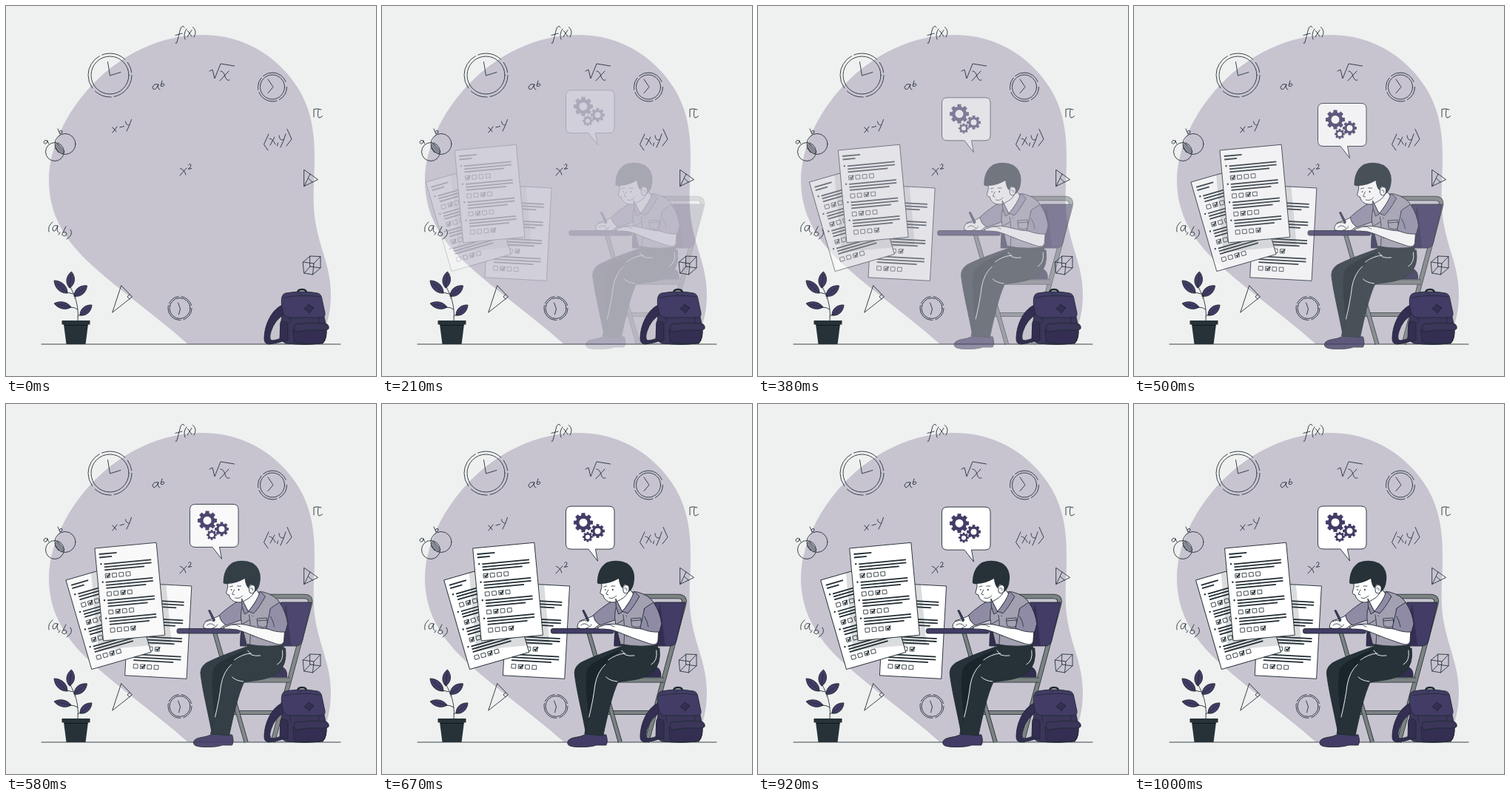
Animation of 500 by 500 pixels, one loop 1.04 s. Source, as an HTML page:

```html
<!DOCTYPE html>
<html lang="en">
<head>
<meta charset="utf-8">
<title>Student at work</title>
<style>
html, body { margin: 0; width: 100%; height: 100%; overflow: hidden; background: #eff1f0; }
svg { display: block; width: 100vw; height: 100vh; }
.ln { fill: none; stroke: #263238; stroke-width: .9; stroke-linecap: round; stroke-linejoin: round; }
.ol { stroke: #1f2b31; stroke-width: .9; stroke-linejoin: round; }
.white { fill: #fff; }
.dark { fill: #263238; }
.shadow { fill: #1a252b; }
.purple { fill: #423c66; }
.mid { fill: #3b365a; }
.deep { fill: #332e52; }
.shirt { fill: #a3a0b1; }
.sleeve { fill: #8f8ba5; }
.thin { fill: none; stroke: #1f2b31; stroke-width: .8; stroke-linecap: round; }
.crease { fill: none; stroke: #fff; stroke-width: .9; stroke-linecap: round; }
.tube { fill: none; stroke-linejoin: round; }
</style>
</head>
<body>
<svg viewBox="0 0 500 500">
  <rect width="500" height="500" fill="#eff1f0"/>
  <path fill="#c7c4d0" d="M246 457C203 419 152 383 117 351C80 318 58 282 58 236C58 150 148 39 266 39C325 39 370 72 394 110C412 138 417 170 417 203C417 235 414 258 417 284C422 325 439 350 439 390C439 420 431 440 420 457Z"/>
  <path class="ln" d="M48 457H452"/>

  <g id="papers"></g>

  <g id="bubble">
    <path class="white ol" d="M256 138H307Q314 138 314 145V189Q314 196 307 196H288.500L291.500 212L279 196H256Q248.500 196 248.500 189V145Q248.500 138 256 138Z"/>
    <path id="gears" class="purple" fill-rule="evenodd"/>
  </g>

  <g id="student">
    <g id="chair"></g>
    <path class="purple ol" d="M369 268H410L398 320Q396 327 389 327H371Z"/>
    <path class="deep" d="M376 270L383 327H373L369 295Z"/>
    <path class="deep ol" d="M292 357L370 355Q378 358 377 369H287Z"/>
    <path class="deep ol" d="M316 300L323 327H314Q314 312 316 300Z"/>

    <!-- legs and shoe -->
    <path class="purple ol" d="M277 446Q268 450 259 451Q250 453 251 459Q252 463 264 463.500Q282 464 290 461H303Q306 456 303 447Z"/>
    <path class="dark ol" d="M323 328C306 334 283 342 268 350Q258 357 261 369C264 391 270 414 276 446H290L308 370L340 340Z"/>
    <path class="shadow" d="M324 331C303 340 284 348 278 358C274 372 277 398 279 420L300 372Z"/>
    <path class="dark ol" d="M326 327L375 330Q378 352 365 363C351 374 332 373 319 376C311 393 305 420 299 448L274 446C279 422 284 405 286 388C287 372 293 361 302 352C309 344 319 338 326 327Z"/>
    <path class="crease" d="M302 352Q291 362 288 380Q286 398 280 423M306 346Q316 338 329 337M303 369Q308 374 318 375M324 333L329 339Q335 341 341 340M371 333Q373 347 364 352"/>

    <!-- far arm -->
    <path class="sleeve ol" d="M320 262Q302 270 285 286Q288 295 295 299L320 290Z"/>
    <path class="white ol" d="M286 286Q276 291 268 293Q264 297 264 302L270 304H286L294 298Q287 294 286 286Z"/>
    <path class="thin" d="M268 294Q274 291 279 294M269 299Q274 294 280 300M276 303Q282 302 283 298"/>
    <path class="purple ol" d="M271 279L273 278.500L280 292L278 294Z"/>

    <!-- torso -->
    <path class="shirt ol" d="M321 263C330 256 337 253 345 254Q361 258 368 269Q376 284 378 297L374 309L371 326Q346 330 323 327Q319 311 316 298Q312 280 321 263Z"/>
    <path class="thin" d="M326 285Q329 300 327 325M354 278Q361 289 356 303M316 298L326 292M337 290L350 289L351 300L345 302L338 300ZM337 293L350 292M330 286L331 287M331 300V301M331 313V314"/>
    <path class="dark" d="M323 324Q348 329 373 325V331H324Z"/>

    <!-- head -->
    <path class="white ol" d="M315 262L325 281L341 258L335 250Z"/>
    <path class="white ol" d="M298 236Q297 243 297 248L295 255Q296 258 299 258Q300 264 306 267Q315 270 323 264Q331 260 335 250L331 229Z"/>
    <path class="dark" d="M291 242Q291 222 304 214Q318 209 331 215Q343 223 341 239Q340 249 334 254Q331 252 332 246Q328 241 325 249Q321 245 320 236Q308 243 297 243Q294 244 291 242Z"/>
    <path class="white ol" d="M326 247Q331 242 334 247Q335 254 330 256Q326 256 326 252Z"/>
    <path class="thin" d="M300 247L304 246M310 246L315 246M306 251Q304 255 303 257L306 258M307 262Q313 264 317 259M328 249Q332 248 331 252"/>
    <circle cx="302" cy="251" r=".8"/><circle cx="312" cy="251" r=".9"/>
    <path class="sleeve ol" d="M316 263L325 281L320 284Q315 274 316 263ZM341 253L348 260Q339 276 332 283L325 280Q336 268 341 253Z"/>

    <rect class="purple ol" x="228.500" y="303.500" width="85" height="6.500" rx="2.500"/>

    <!-- near arm -->
    <path class="white ol" d="M352 304Q342 304 328 300Q314 296 303 298L291 302Q293 305 299 304Q310 304 319 308Q340 317 362 324Q371 327 373 321L374 306Z"/>
    <path class="sleeve ol" d="M355 276Q352 290 349 303Q362 309 375 308L378 297Q376 281 367 268Z"/>
    <path class="thin" d="M355 287Q359 294 360 301M303 298Q308 297 314 301"/>
  </g>

  <g id="bag">
    <path class="deep ol" d="M376 403C360 408 349 430 349 450Q349 457 356 457Q366 456 380 451L378 446Q366 452 359 452Q355 450 358 440Q363 424 376 417Z"/>
    <path class="tube" d="M394 388Q394 383 400 383Q406 383 406 388" stroke="#1f2b31" stroke-width="2.500"/>
    <path class="mid ol" d="M376 405L371 430Q368 452 378 456Q404 459 428 456Q435 450 432 430L427 405Z"/>
    <path class="deep ol" d="M371 427Q378 424 381 429V452Q374 454 370 449Z"/>
    <path class="purple ol" d="M378 388Q400 384 421 388Q426 389 427 396L431 415Q432 421 424 421H384Q376 421 374 413Q371 400 373 393Q374 389 378 388Z"/>
    <path class="deep ol" d="M388 437L389 454Q409 459 428 455Q434 449 433 436Z"/>
    <path class="mid ol" d="M391 430Q411 427 432 429Q437 431 436 436Q433 439 424 438Q407 437 393 440Q387 438 391 430Z"/>
    <path class="deep ol" d="M403 409L409 403L416 408L410 415Z"/>
    <path class="thin" d="M384 421V429M423 421V428M376 394Q400 389 424 393M398 388V390"/>
  </g>

  <g id="plant">
    <path class="ln" d="M97 426Q99 405 91 388Q88 383 86 376M91 389L82 387M93 395L95 391M97 410Q93 407 87 407M97 419L102 416"/>
    <path class="dark" d="M75.500 425H113.500V430.500H75.500ZM78 430H111L107.500 457H81.500Z"/>
    <path d="M79 431.500H110" stroke="#111a1e"/>
  </g>

  <g class="ln">
    <!-- formulas -->
    <path d="M241 29Q239 25 236 30L231 49Q230 52 229 50M229 39.500L238 37M244 31Q239 38 242 45M245.500 33.500L251 41M251 32.500L245 42M252.500 28.500Q259 34 254 42"/>
    <path d="M275 88L279 86L282 98L290 78L308.500 81M290 88Q294 88 296 95T302 100M301 88L289 101"/>
    <path d="M206 106Q200 104 198 110Q199 115 203 111L206 106Q204 112 208 113M211 101L209 108Q213 110 214 106Q213 104 210 106"/>
    <path d="M143.500 164Q147 166 149 170M150 163L144 171M154 164L159.500 162.500M161.500 156Q162 161 166 161M169.500 153.500Q167 162 163 169"/>
    <path d="M355 173L348.500 187L354 195M380 166.500L386 180L379 189M356 179Q360 179 364 187M363 177L357 188M367.500 185L366.500 189M369 175Q369 182 375 181M378 173Q375 183 371 191"/>
    <path d="M416 150V139.500Q421 138 426 140M422 140Q420 152 424 151L427.500 149"/>
    <path d="M235.500 219.500Q241 221 243 228M244 219L235 229M246.500 215Q249 212 250 215Q250 218 246 220.500L251 219.500"/>
    <path d="M63 292Q56 297 58 305M70 297Q64 295 63 301Q63 306 67 303L70 297Q68 304 71 306M73 306L71 309M81 298L75.500 309Q80 313 82 308Q81 304 77 306M87 302Q92 309 82 315"/>

    <!-- overlapping sets -->
    <circle cx="80" cy="186.500" r="14"/><circle cx="66" cy="197" r="12.500"/>
    <path d="M67 187L77 200M66 189L74 199M68 185.500L78 198.500M70 186L78.500 196M66.500 192L71 198"/>
    <path d="M56 182Q52 180 51 184Q52 188 55 185L56 182L57.500 186M70 166L73 173Q77 172 76 169Q74 167 72 170"/>

    <!-- clocks -->
    <circle cx="140.500" cy="93.500" r="25.500"/>
    <circle cx="140.500" cy="93.500" r="29.500" pathLength="100" stroke-dasharray="22 2 13 3 27 2 18 3 8 2"/>
    <path d="M137.500 75.500L140.500 94L155 89.500"/>
    <circle cx="360" cy="109.500" r="16.500"/>
    <circle cx="360" cy="109.500" r="19.500" pathLength="100" stroke-dasharray="17 3 24 3 14 3 30 6"/>
    <path d="M354 99L361 109.500L354 117.500"/>
    <circle cx="235" cy="408.500" r="14"/>
    <circle cx="235" cy="408.500" r="16" pathLength="100" stroke-dasharray="20 4 30 3 16 4 19 4"/>
    <path d="M232.500 401L235.500 409L233.500 417"/>

    <!-- solids and triangles -->
    <path d="M403 221.500L421.500 234.500L403 243.500ZM403 243.500L411 227M408.500 233L414 238"/>
    <path d="M156 378L170.500 393L144 414ZM167 389.500L164 393L167 396"/>
    <path d="M401.500 346L416 348L414.500 363L403 361ZM411 338L425 338.500L425 354L411 352ZM401.500 346L411 338M416 348L425 338.500M414.500 363L425 354M403 361L411 352"/>
  </g>
</svg>
<script>
const byId = id => document.getElementById(id);
const add = (id, markup) => byId(id).insertAdjacentHTML('beforeend', markup);

// A sheet with four questions; ticks gives the checked box in each row.
const W = 83.5, H = 125.5;
function sheet(ticks) {
  let lines = 'M5 8.500h24M5 13h17', dots = '', boxes = '', marks = '';
  ticks.forEach((tick, row) => {
    const y = 22.4 + row * 24.6;
    lines += `M10.500 ${y}h64M10.500 ${y + 4}h64M10.500 ${y + 8}h54`;
    dots += `<circle cx="6.500" cy="${y - .5}" r="1.200" fill="#212d33"/>`;
    for (let i = 0; i < 4; i++) boxes += `M${11.3 + i * 9.3} ${y + 13.4}h5.400v5.400h-5.400z`;
    marks += `M${12.3 + tick * 9.3} ${y + 15.6}l1.700 2l3.500-4.500`;
  });
  return `<path d="${lines}" stroke="#212d33" stroke-width="1.800"/>${dots}
    <path class="thin" d="${boxes}"/>
    <path d="${marks}" fill="none" stroke="#212d33" stroke-width="1.700"/>`;
}
const page = '<rect class="white ol" width="83.500" height="125.500"/>';
const front = 'translate(122.500 195) rotate(-5.300)';
const left = 'translate(83.500 238) rotate(-16.100)';
const right = 'translate(170 241.500) rotate(3.100)';
const shade = at => `<rect transform="${at}" x="-8" y="2" width="${W + 16}" height="${H + 10}" fill="#263238" opacity=".17"/>`;
const clip = (id, at) => `<clipPath id="${id}"><rect transform="${at}" width="${W}" height="${H}"/></clipPath>`;
const place = (at, ticks) => `<g transform="${at}">${page}${sheet(ticks)}</g>`;
add('papers', clip('onLeft', left) + clip('onRight', right) +
  place(right, [1, 2, 3, 1]) + `<g clip-path="url(#onRight)">${shade(front)}</g>` +
  place(left, [1, 0, 0, 2]) + `<g clip-path="url(#onLeft)">${shade(front)}</g>` +
  place(front, [0, 2, 1, 3]));

function gear(cx, cy, r, hole) {
  const pts = [];
  for (let i = 0; i < 8; i++) {
    [[-.27, .76], [-.19, 1], [.19, 1], [.27, .76]].forEach(([da, k]) => {
      const a = i * Math.PI / 4 + da;
      pts.push((cx + r * k * Math.cos(a)).toFixed(2) + ' ' + (cy + r * k * Math.sin(a)).toFixed(2));
    });
  }
  return `M${pts.join('L')}ZM${cx - hole} ${cy}a${hole} ${hole} 0 1 0 ${2 * hole} 0a${hole} ${hole} 0 1 0 ${-2 * hole} 0Z`;
}
byId('gears').setAttribute('d',
  gear(272, 160, 13.2, 5.5) + gear(291.5, 171.5, 9.6, 4) + gear(278, 179.5, 7, 3));

// Outlined metal tubes of the chair.
const tube = (d, w) => `<path class="tube" d="${d}" stroke="#1f2b31" stroke-width="${w}"/>
  <path class="tube" d="${d}" stroke="#7c8282" stroke-width="${w - 1.6}"/>`;
add('chair', tube('M304 417H370', 6) + tube('M279 307L322 457', 6) +
  tube('M345 260H400Q411 260 408 271L358 457', 6.5) + tube('M284 373H381', 7));

function leaf(x, y, tx, ty, w) {
  const dx = tx - x, dy = ty - y, n = Math.hypot(dx, dy);
  const nx = -dy / n * w, ny = dx / n * w;
  const side = s => `${x + dx * .25 + nx * s} ${y + dy * .25 + ny * s}`;
  const far = s => `${x + dx * .7 + nx * s} ${y + dy * .7 + ny * s}`;
  return `<path class="purple ol" d="M${x} ${y}C${side(1)} ${far(1)} ${tx} ${ty}C${far(-1)} ${side(-1)} ${x} ${y}Z"/>
    <path class="thin" d="M${x} ${y}L${x + dx * .8} ${y + dy * .8}"/>`;
}
add('plant', leaf(86, 381, 88.5, 359, 7) + leaf(83, 388, 65, 371, 7) +
  leaf(92, 392, 109.5, 378, 7) + leaf(88, 407, 65, 402, 6) + leaf(100, 418, 116, 404, 6.5));

// cubic-bezier(.36, -.01, .5, 1.38): slow start, slight overshoot
const curve = (s, a, b) => 3 * (1 - s) ** 2 * s * a + 3 * (1 - s) * s * s * b + s ** 3;
function ease(x) {
  if (x >= 1) return 1;
  let lo = 0, hi = 1;
  for (let i = 0; i < 24; i++) {
    const mid = (lo + hi) / 2;
    if (curve(mid, .36, .5) < x) lo = mid; else hi = mid;
  }
  return curve(lo, -.01, 1.38);
}

const LOOP = 1040, FPS = 24, SLIDE = 30;
const movers = [['papers', -1, 0], ['bubble', 0, -1], ['student', 1, 0]]
  .map(([id, x, y]) => ({ node: byId(id), x, y }));
const start = performance.now();

function draw(now) {
  const t = Math.max(0, now - start) % LOOP;
  // Steps of 1/24 s, rounded to hundredths of a second.
  const step = Math.floor((Math.floor(t / 10) * 10 + 4.9) * FPS / 1000);
  const p = step < 3 ? 0 : ease((step + .5) / FPS);
  const d = SLIDE * (1 - p);
  for (const m of movers) {
    m.node.setAttribute('transform', `translate(${m.x * d} ${m.y * d})`);
    m.node.setAttribute('opacity', Math.min(1, p));
  }
  requestAnimationFrame(draw);
}
draw(start);
</script>
</body>
</html>
```
